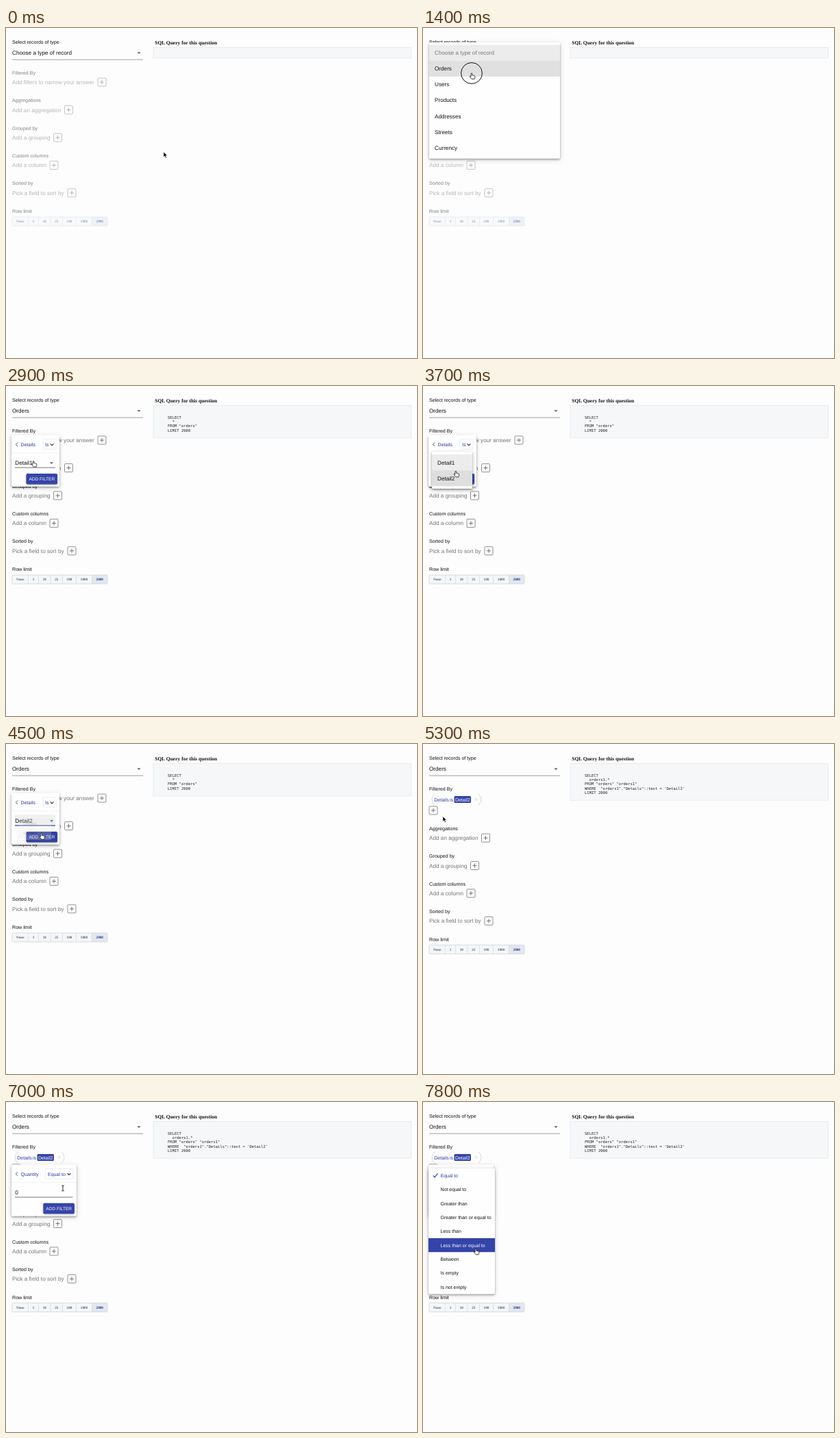
An HTML page that plays this animation: 600 by 482 pixels, repeating every 8 s.

```html
<!DOCTYPE html>
<html lang="en">
<head>
<meta charset="utf-8">
<title>Query builder</title>
<style>
html, body { margin: 0; width: 100%; height: 100%; overflow: hidden; background: #fdfdfd; }
svg { display: block; width: 600px; height: 482px; }
text { font-family: "Liberation Sans", Arial, sans-serif; text-rendering: geometricPrecision; white-space: pre; }
.serif { font-family: "Liberation Serif", Times, serif; font-weight: bold; }
.mono { font-family: "DejaVu Sans Mono", monospace; }
</style>
</head>
<body>
<svg id="stage" viewBox="0 0 600 482" xmlns="http://www.w3.org/2000/svg"></svg>
<script>
const LOOP = 8000, STEP = 100;
const BLUE = '#3444a8', LINK = '#2b3aa5', GREY = '#757575';
const ROW = 23.13, OP_ROW = 20.37, SHIFT = 17.6;

// y is the vertical middle of the capitals
const text = (x, y, s, size = 8.17, fill = '#111', extra = '') =>
  `<text x="${x}" y="${y + size * 0.36}" font-size="${size}" fill="${fill}" ${extra}>${s}</text>`;
const rect = (x, y, w, h, fill, extra = '') =>
  `<rect x="${x}" y="${y}" width="${w}" height="${h}" fill="${fill}" ${extra}/>`;
const path = (d, stroke, w = 0.8, extra = '') =>
  `<path d="${d}" fill="none" stroke="${stroke}" stroke-width="${w}" ${extra}/>`;
const group = (id, body, extra = '') => `<g id="${id}" ${extra}>${body}</g>`;
const paper = (x, y, w, h) => rect(x, y, w, h, '#fefefe', 'rx="1.8" filter="url(#shadow)"');
const caret = (x, y) => `<path d="M${x - 2.7} ${y - 1.3}h5.4l-2.7 2.7z" fill="#666"/>`;
const chevron = (x, y, c = '#333', r = 2.4) =>
  path(`M${x - r} ${y - r / 2}l${r} ${r}l${r} ${-r}`, c, 1.1);
const plus = (x, y) =>
  rect(x - 6, y - 6, 12, 12, 'none', 'rx="1" stroke="#858585" stroke-width=".9"') +
  path(`M${x - 3} ${y}h6M${x} ${y - 3}v6`, '#666', 0.9);

function section(i, label, hint, px) {
  const y = 65.2 + i * 40.4;
  return text(9, y, label, 7.12) + text(9, y + 14, hint, 8.2, GREY) + plus(px, y + 14);
}

function rowLimit() {
  const names = ['None', '1', '10', '25', '100', '1000', '2000'];
  const edges = [9, 32.5, 47.5, 65, 82.5, 102.5, 125.5, 148];
  let out = text(9, 267.4, 'Row limit', 7.12) + rect(9, 276, 139, 13, '#f4f6f8', 'rx="1.5"') +
    rect(125.5, 276, 22.5, 13, '#e2e8ee');
  names.forEach((s, i) => {
    const mid = (edges[i] + edges[i + 1]) / 2;
    out += text(mid, 282.4, s, 5.2, i === 6 ? '#1f2f9c' : '#566270', 'class="serif" text-anchor="middle"');
    if (i) out += path(`M${edges[i]} 276v13`, '#d3d9df', 0.7);
  });
  return out + rect(9, 276, 139, 13, 'none', 'rx="1.5" stroke="#cdd4da" stroke-width=".8"');
}

function code(id, lines) {
  const h = 28 + lines.length * 6.35 - 6;
  return group(id, rect(215, 28.5, 376.5, h, '#f5f7f9', 'stroke="#e4e8ec" stroke-width=".8"') +
    lines.map((s, i) => text(236, 45.6 + i * 6.35, s, 5.52, '#222', 'class="mono" xml:space="preserve"')).join(''));
}

const fieldIcons = [
  path('M17.5 0a1.2 1.2 0 1 0 0 .1h4v1.3M20 0v1', '#aaa', 0.8),
  text(16, 0, 'Aa', 4.6, '#bbb'),
  path('M16.5 -2.2h5v5h-5zM16.5 -1.4h5M17.7 -3v1M20.3 -3v1', '#999', 0.8),
  path('M20 -2.3l-2 2.4h1.6l-1.2 2.4', '#999', 0.8),
  path('M16.7 0a2.3 2.3 0 1 0 4.6 0a2.3 2.3 0 1 0 -4.6 0M17.9 0l.8 .9l1.5 -1.7', '#aaa', 0.7),
  path('M21 -2l-4 2l4 2', '#aaa', 0.8),
  path('M21 -2l-4 2l4 2', '#aaa', 0.8)
];
const fields = ['ID', 'Details', 'Created At', 'Quantity', 'Paid', 'ProductID', 'UserID'];
const types = ['Choose a type of record', 'Orders', 'Users', 'Products', 'Addresses', 'Streets', 'Currency'];
const ops = ['Equal to', 'Not equal to', 'Greater than', 'Greater than or equal to', 'Less than',
  'Less than or equal to', 'Between', 'Is empty', 'Is not empty'];

const typeMenu = paper(9, 21, 191, 169.6) + rect(9, 24.6, 191, ROW, '#ececec') +
  rect(9, 24.6, 191, ROW, '#e0e0e0', 'id="typeHover"') +
  types.map((s, i) => text(17, 36.1 + i * ROW, s, 8.17, i ? '#111' : '#777')).join('');

const fieldMenu = paper(8, 0, 94, 162) + rect(8, 0, 94, ROW, '#e2e2e2', 'id="fieldHover"') +
  fields.map((s, i) => {
    const y = (i + 0.5) * ROW;
    return `<g transform="translate(0 ${y})">${fieldIcons[i]}</g>` + text(38, y, s, 8.1) +
      (i > 4 ? chevron(88, y) : '');
  }).join('');

function formFrame(w, title, op, boxX, opX) {
  const r = 8 + w;
  return paper(8, 0, w, 75) + path('M17.2 10.7l-2.8 2.8l2.8 2.8', '#444', 0.9) +
    text(21.6, 13.6, title, 7, LINK) +
    rect(boxX, 6, r - 5 - boxX, 14.5, '#fefefe', 'rx="1.5" stroke="#e6e6e6" stroke-width=".7"') +
    text(opX, 13.6, op, 7.05, LINK) + chevron(r - 11, 13.8, '#223') +
    path(`M8 26h${w}`, '#eeeeee', 0.7);
}
const addButton = (x, id) =>
  rect(x, 56.3, 45.5, 15.5, BLUE, `id="${id}" rx="1.8" filter="url(#soft)"`) +
  text(x + 22.8, 64.1, 'ADD FILTER', 6.55, '#fff', 'text-anchor="middle"');

const detailForm = formFrame(70, 'Details', 'Is', 54, 57) +
  rect(13, 31.5, 59, 15.5, '#f0f0f0', 'id="focusBack"') +
  text(13.3, 40.4, 'Detail1', 8.17, '#111', 'id="detailValue"') + caret(66.5, 40.7) +
  path('M13 47.4h59', '#555', 0.8, 'id="detailLine"') + addButton(29.5, 'detailAdd');

const quantityForm = formFrame(95, 'Quantity', 'Equal to', 57.5, 61) + text(13.2, 40.2, '0') +
  path('M13 47.5h84.5', '#555', 0.8) + addButton(54.4, 'quantityAdd');

const detailMenu = paper(13, 96, 59, 54) + rect(13, 100, 59, ROW, '#ececec') +
  rect(13, 100, 59, ROW, '#dedede', 'id="detailHover"') +
  text(21, 111.6, 'Detail1') + text(21, 134.7, 'Detail2');

const opMenu = paper(8, 97, 97, 183.3) + rect(8, 97, 97, OP_ROW, BLUE, 'id="opHover"') +
  path('M14.8 107.4l2.2 2.4l4.6 -5.4', LINK, 1.1, 'id="tick"') +
  ops.map((s, i) => text(25.6, 107.3 + i * OP_ROW, s, 6.97, '#111', 'class="op"')).join('');

const chip = path('M17 72.5Q9 81 17 89.5M81 72.5Q89 81 81 89.5', '#cfcfcf', 0.8) +
  text(16.3, 81, 'Details', 7, LINK) + text(39, 81, 'is', 7, LINK) +
  rect(45.5, 76, 24.5, 10, BLUE, 'rx="1.5"') + text(46.9, 81, 'Detail2', 7, '#fff') +
  path('M75.4 78.9l4 4M79.4 78.9l-4 4', '#d0d0d0', 0.8) + plus(15, 97);

const pointers = group('arrow',
  '<path d="M0 0v7.6l1.8-1.6l1.3 2.9l1.4-.6l-1.3-2.8h2.4z" fill="#000" stroke="#fff" stroke-width=".6"/>') +
  group('hand', '<path d="M-.9 .9Q-.9 0 0 0Q.9 0 .9 .9V3.2Q2 2.6 2.3 3.4Q3.4 2.9 3.7 3.8Q4.8 3.5 4.8 4.8V6.2Q4.8 7.2 4 8.6H.2Q-1 7 -2.6 5Q-2.9 4 -1.9 4.2L-.9 5Z" fill="#fff" stroke="#111" stroke-width=".8"/>') +
  group('beam', path('M-1.8 -4Q0 -4 0 -3V3Q0 4 -1.8 4M1.8 -4Q0 -4 0 -3M0 3Q0 4 1.8 4', '#111', 0.9));

document.getElementById('stage').innerHTML = `
  <defs>
    <filter id="shadow" x="-20%" y="-20%" width="140%" height="150%">
      <feDropShadow dx="0" dy="1.6" stdDeviation="1.3" flood-opacity=".32"/>
      <feDropShadow dx="0" dy="1.5" stdDeviation="3" flood-opacity=".18"/>
    </filter>
    <filter id="soft" x="-20%" y="-30%" width="140%" height="180%">
      <feDropShadow dx="0" dy=".9" stdDeviation=".8" flood-opacity=".35"/>
    </filter>
  </defs>` +
  rect(0, 0, 600, 482, '#fdfdfd') +
  text(9, 20.2, 'Select records of type', 7.12) +
  text(9, 36.2, types[0], 8.17, '#111', 'id="typeValue"') + caret(194, 36.5) +
  path('M9 46.2h191', '#888', 0.8) +
  text(217.3, 21.2, 'SQL Query for this question', 7.52, '#111', 'class="serif"') +
  group('sqlNone', rect(215, 28.5, 376.5, 15.5, '#f5f7f9', 'stroke="#e4e8ec" stroke-width=".8"')) +
  code('sqlAll', ['SELECT', '  *', 'FROM "orders"', 'LIMIT 2000']) +
  code('sqlWhere', ['SELECT', '  orders1.*', 'FROM "orders" "orders1"',
    'WHERE  "orders1"."Details"::text = \'Detail2\'', 'LIMIT 2000']) +
  group('sections',
    text(9, 65.2, 'Filtered By', 7.12) +
    group('noFilter', text(9, 79.2, 'Add filters to narrow your answer', 8.2, GREY) + plus(140, 79.1)) +
    group('chip', chip) +
    group('lower',
      section(1, 'Aggregations', 'Add an aggregation', 91.5) +
      section(2, 'Grouped by', 'Add a grouping', 75.5) +
      section(3, 'Custom columns', 'Add a column', 70) +
      section(4, 'Sorted by', 'Pick a field to sort by', 96) + rowLimit())) +
  group('typeMenu', typeMenu) + group('fieldMenu', fieldMenu) +
  group('detailForm', detailForm) + group('detailMenu', detailMenu) +
  group('quantityForm', quantityForm) + group('opMenu', opMenu) +
  group('pointer', '<circle id="ring" r="15.4" fill="none" stroke="#111" stroke-width="1"/>' + pointers);

const el = {};
document.querySelectorAll('[id]').forEach(n => { el[n.id] = n; });
const opTexts = [...document.querySelectorAll('.op')];

const clamp = v => Math.max(0, Math.min(1, v));
const show = (id, on) => el[id].setAttribute('display', on ? 'inline' : 'none');
const set = (id, key, v) => el[id].setAttribute(key, v);
const within = (t, a, b) => t >= a && t < b;

// Fades and scales a popup around its centre; dy moves it down the page
function pop(id, t, on, off, cx, cy, dy = 0, growIn = true, fadeOut = 250) {
  const a = growIn ? clamp((t - on + 100) / 250) : +(t >= on);
  const b = fadeOut ? clamp(1 - (t - off) / fadeOut) : +(t < off);
  const k = Math.min(a, b), s = 0.75 + 0.25 * k;
  show(id, k > 0);
  set(id, 'opacity', k);
  set(id, 'transform', `translate(${cx} ${cy + dy}) scale(${s} ${s * s}) translate(${-cx} ${-cy})`);
}

function hover(id, y, top, row, count) {
  const i = Math.floor((y - top) / row);
  show(id, i >= 0 && i < count);
  return i;
}

// time, x, y of the pointer tip
const route = [
  [0, 230, 181], [100, 229, 179], [700, 92, 37], [900, 92, 37], [1200, 71, 66], [1600, 71, 66],
  [2200, 125, 61], [2300, 125, 61], [2600, 50, 106], [2700, 50, 107], [2900, 40, 109.6],
  [3400, 41, 112], [3900, 51.5, 131], [4900, 51.5, 130.4], [5500, 21, 97], [5700, 21, 97],
  [6000, 43, 137.4], [6300, 50, 172], [6500, 50, 172], [7000, 83, 126], [7200, 84, 105],
  [7300, 84, 105], [7600, 76.5, 212.8], [7800, 77, 214.3]
];
function pointerAt(t) {
  let i = route.findIndex(p => p[0] > t);
  if (i < 0) return route[route.length - 1].slice(1);
  const [t0, x0, y0] = route[i - 1], [t1, x1, y1] = route[i];
  const u = (t - t0) / (t1 - t0), e = u * u * (3 - 2 * u);
  return [x0 + (x1 - x0) * e, y0 + (y1 - y0) * e];
}
const presses = [[800, 1000], [1400, 1600], [2300, 2400], [2600, 2700], [3300, 3400],
  [4100, 4300], [4800, 5000], [5600, 5700], [6400, 6500], [7200, 7300]];

function shape(t) {
  if (within(t, 6900, 7100)) return 'beam';
  const free = t < 500 || within(t, 1700, 2200) || within(t, 5100, 5400) || within(t, 6600, 6900);
  return free ? 'arrow' : 'hand';
}

function render(t) {
  const [x, y] = pointerAt(t);
  set('pointer', 'transform', `translate(${x} ${y})`);
  ['arrow', 'hand', 'beam'].forEach(s => show(s, s === shape(t)));
  show('ring', presses.some(p => within(t, p[0], p[1])));

  const filtered = t >= 5100;
  el.typeValue.textContent = types[t >= 1600 ? 1 : 0];
  set('sections', 'opacity', 0.52 + 0.48 * clamp((t - 1600) / 200));
  show('sqlNone', t < 1900);
  show('sqlAll', within(t, 1900, 5200));
  show('sqlWhere', t >= 5200);
  show('noFilter', !filtered);
  show('chip', filtered);
  set('lower', 'transform', `translate(0 ${filtered ? SHIFT : 0})`);

  pop('typeMenu', t, 1000, 1600, 104, 60);
  const type = hover('typeHover', Math.min(y, 66), 24.6, ROW, 7);
  set('typeHover', 'y', 24.6 + type * ROW);

  const second = t >= 5000, top = second ? 91.5 : 71.8;
  if (second) pop('fieldMenu', t, 5700, 6500, 55, 0, top, true, 0);
  else pop('fieldMenu', t, 2400, 2700, 55, 0, top, true, 0);
  const field = hover('fieldHover', y, top, ROW, 7);
  set('fieldHover', 'y', field * ROW);

  pop('detailForm', t, 2700, 5000, 43, 0, 71.8, false, 250);
  const focused = t >= 3400;
  show('focusBack', focused);
  set('detailLine', 'stroke', focused ? BLUE : '#555');
  set('detailLine', 'stroke-width', focused ? 1.3 : 0.8);
  el.detailValue.textContent = t >= 4300 ? 'Detail2' : 'Detail1';
  set('detailAdd', 'fill', t >= 4400 ? '#303f9f' : BLUE);

  pop('detailMenu', t, 3400, 4300, 42.5, 123);
  const detail = hover('detailHover', y, 100, ROW, 2);
  set('detailHover', 'y', 100 + detail * ROW);

  pop('quantityForm', t, 6500, LOOP + 1, 55, 0, 91.5, false);
  set('quantityAdd', 'fill', within(t, 6600, 6800) && y > 147 ? '#303f9f' : BLUE);

  show('opMenu', t >= 7300);
  const op = hover('opHover', y, 97, OP_ROW, 9);
  set('opHover', 'y', 97 + op * OP_ROW);
  opTexts.forEach((n, i) => n.setAttribute('fill', i === op ? '#fff' : i ? '#111' : LINK));
  set('tick', 'stroke', op === 0 ? '#fff' : LINK);
}

const start = performance.now();
function frame(now) {
  const t = Math.max(0, now - start) % LOOP;
  render(Math.min(7800, Math.floor(t / STEP) * STEP));
  requestAnimationFrame(frame);
}
render(0);
requestAnimationFrame(frame);
</script>
</body>
</html>
```
